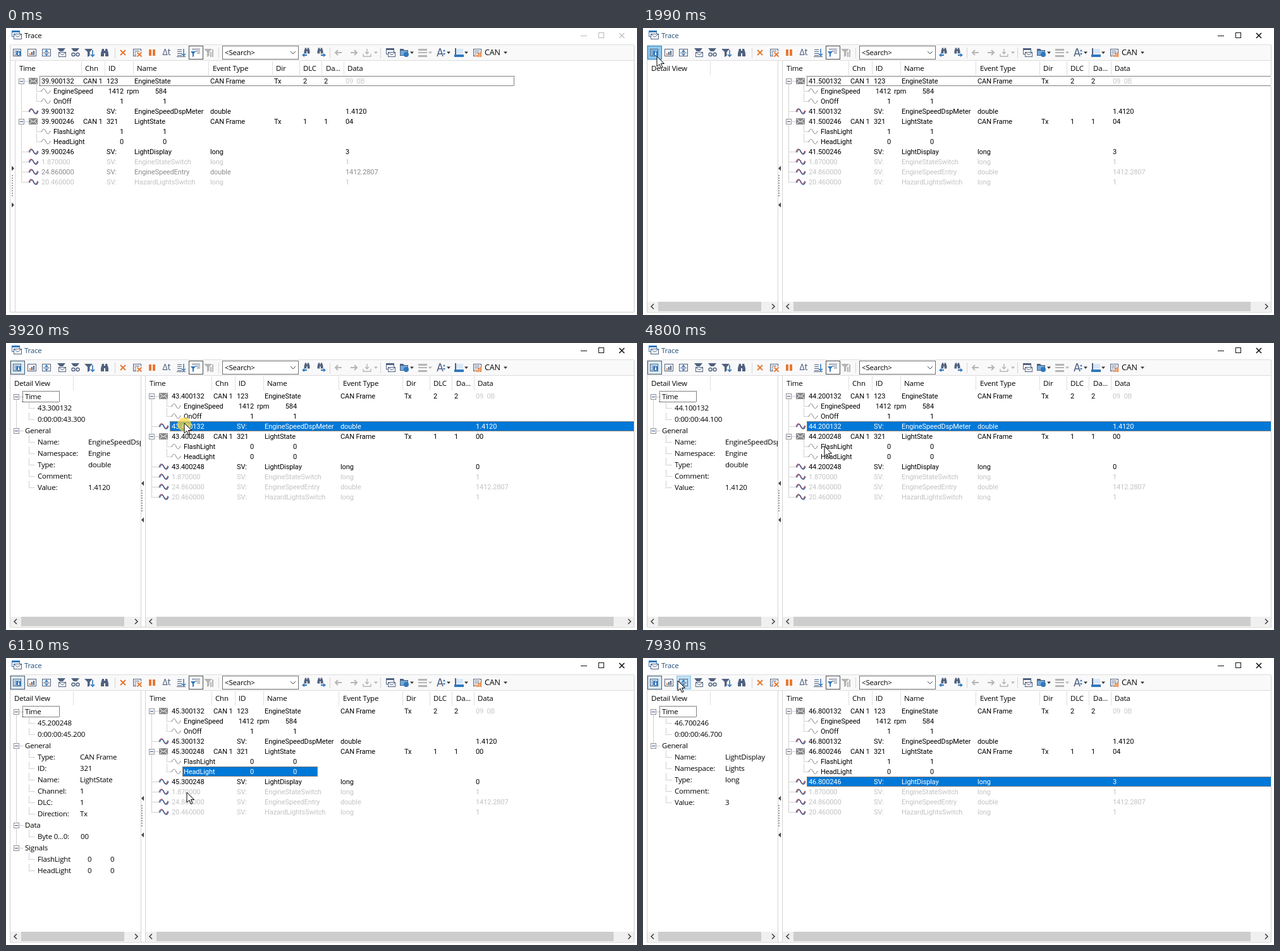
Recreate the animation shown at these times as an HTML page with a canvas. Size 998 px wide and 455 px high, loop 8000 ms.

```html
<!DOCTYPE html>
<html lang="en">
<head>
<meta charset="utf-8">
<title>Trace</title>
<style>
html, body { margin: 0; width: 998px; height: 455px; overflow: hidden; background: #fff; }
canvas { display: block; }
</style>
</head>
<body>
<canvas id="stage" width="998" height="455"></canvas>
<script>
const g = document.getElementById('stage').getContext('2d');
const LOOP = 8000, OPEN = 1780, SHIFT = 206;
const UI = '11.5px "Open Sans", "Noto Sans", sans-serif';
const ROW = '11px Roboto, "Liberation Sans", sans-serif';
const SLATE = '#50617f', BLUE = '#2f78bd', ORANGE = '#e87830', GRAY = '#b5b5b5', STALE = '#c3c3c3';

// time in ms -> simulation time in tenths of a second
const CLOCK = [[0, 399], [70, 400], [330, 401], [1960, 415], [2840, 425], [4790, 442],
  [6105, 453], [6920, 460], [7925, 468], [8000, 468.5]];
const POINTER = [[530, 250, 440], [900, 120, 200], [1270, 45, 57], [1530, 22, 45], [2200, 22, 45],
  [2720, 275, 83], [3300, 275, 83], [3650, 282, 127], [4320, 282, 127], [4700, 287, 163],
  [5190, 287, 166], [5340, 286, 166], [5560, 286, 179], [5800, 286, 181], [6080, 286, 213],
  [6420, 286, 213], [6620, 284, 193], [7150, 284, 193], [7580, 70, 46], [7800, 55, 36], [8000, 55, 36]];
const CLICKS = [1700, 2800, 3780, 4900, 5580, 6270, 6830];
const SELECT = [[2830, 0], [3800, 3], [4940, 5], [5610, 6], [6300, 8], [6870, 7]];

function track(keys, t) {
  let i = 1;
  while (i < keys.length - 1 && keys[i][0] <= t) i++;
  const a = keys[i - 1], b = keys[i];
  const k = Math.min(1, Math.max(0, (t - a[0]) / (b[0] - a[0])));
  return a.slice(1).map((v, j) => v + (b[j + 1] - v) * k);
}

function stateAt(t) {
  const n = Math.floor(track(CLOCK, Math.max(0, t))[0] + 1e-6);
  const on = n % 10 >= 5;
  return { on, sec: (n / 10).toFixed(1) + '00', tail: on ? '246' : '248' };
}

function box(x, y, w, h, fill) { g.fillStyle = fill; g.fillRect(x, y, w, h); }
function frame(x, y, w, h, color) {
  g.strokeStyle = color; g.lineWidth = 1;
  g.strokeRect(x + .5, y + .5, w - 1, h - 1);
}
function line(x1, y1, x2, y2, color, dash = []) {
  g.strokeStyle = color; g.lineWidth = 1; g.setLineDash(dash);
  g.beginPath(); g.moveTo(x1, y1); g.lineTo(x2, y2); g.stroke(); g.setLineDash([]);
}
// one-pixel dots, aligned to the pixel grid
function dots(x1, y1, x2, y2, c = '#a0a0a0') {
  const ox = x1 === x2 ? .5 : 0, oy = .5 - ox;
  line(x1 + ox, y1 + oy, x2 + ox, y2 + oy, c, [1, 1]);
}
function dotFrame(x, y, w, h, c) {
  dots(x, y, x + w, y, c); dots(x, y + h, x + w, y + h, c);
  dots(x, y, x, y + h, c); dots(x + w, y, x + w, y + h, c);
}
function text(s, x, y, color = '#000', font = ROW, align = 'left') {
  g.font = font; g.textAlign = align; g.fillStyle = color;
  g.letterSpacing = font === UI ? '-0.2px' : '-0.1px';
  g.fillText(s, x, y + 4);
}
const label = (s, x, y, c = '#000', align) => text(s, x, y, c, UI, align);
function path(x, y, d, fill, stroke, width = 1) {
  g.save(); g.translate(x, y);
  const p = new Path2D(d);
  if (fill) { g.fillStyle = fill; g.fill(p); }
  if (stroke) { g.strokeStyle = stroke; g.lineWidth = width; g.stroke(p); }
  g.restore();
}

function envelope(x, y, w, h, c, bg = '#fff') {
  box(x, y, w, h, bg); frame(x, y, w, h, c);
  path(x, y, `M1 1L${w / 2} ${h * .6}L${w - 1} 1`, null, c);
}
function wave(x, y, c, w = 1) { path(x, y, 'M0 1C2 -5 5 -5 7 0S12 5 14 -1', null, c, w); }
function expander(x, y) {
  box(x - 4, y - 4, 9, 9, '#fff'); frame(x - 4, y - 4, 9, 9, '#919191');
  box(x - 2, y, 5, 1, '#2f4f8f');
}
const caret = (x, c = '#333') => path(x, 39, 'M-3 -1.5H3L0 2Z', c);
const funnel = (x, c) => path(x, 39, 'M-7 -6H6L1.5 -1V5L-2 7V-1Z', c);
const binoculars = (x, y, c = SLATE, s = 1) => {
  g.save(); g.translate(x, y); g.scale(s, s);
  path(0, 0, 'M-4 -6H-1V-3H1V-6H4L6 1V6H1V1H-1V6H-6V1Z', c);
  g.restore();
};
const cross = (x, y, r, w) => path(x, y, `M${-r} ${-r}L${r} ${r}M${r} ${-r}L${-r} ${r}`, null, ORANGE, w);
const arrow = (x, y, dir, c) => path(x, y, `M${-5 * dir} 0H${4 * dir}M${dir} -4L${5 * dir} 0L${dir} 4`, null, c, 2);
const smallArrow = (x, y, dir) => path(x, y, `M${-4 * dir} -1H0V-3L${4 * dir} 0L0 3V1H${-4 * dir}Z`, BLUE);
function page(x, c, rows = 3) {
  frame(x - 7, 33, 13, 12, c);
  for (let i = 0; i < rows; i++) box(x - 5, 36 + i * 3, 8, 1, c);
}

function button(x, border, fill) { box(x - 11, 28, 23, 22, fill); frame(x - 11, 28, 23, 22, border); }

function toolbar(t, px, py) {
  box(7, 26, 986, 26, '#f9f9fa');
  line(7, 26.5, 993, 26.5, '#dcdddf');
  const over = x => t > 1300 && py > 27 && py < 51 && Math.abs(px - x) < 12;
  const open = t >= OPEN;
  if (open) button(18, over(18) ? '#2580c4' : '#4c5765', over(18) ? '#8fc8ef' : '#d9ebf8');
  else if (over(18)) button(18, '#86bfe8', '#c6e0f4');
  for (const x of [41, 64]) if (over(x)) button(x, '#8fc3ea', '#c3dff4');
  button(300, '#4b4b4b', '#fff');

  page(18, SLATE);
  path(20, 40, 'M4 0A4 4 0 1 1 -4 0A4 4 0 1 1 4 0Z', BLUE);
  box(19, 39, 2, 4, '#fff'); box(19, 37, 2, 1, '#fff');
  frame(34, 33, 14, 12, SLATE);
  box(37, 40, 2, 3, ORANGE); box(40, 38, 2, 5, SLATE); box(43, 36, 2, 7, SLATE);
  frame(57, 33, 14, 12, SLATE);
  path(64, 39, 'M-5 .5H5', null, SLATE);
  path(64, 39, 'M-3 -1L0 -5L3 -1ZM-3 2L0 5L3 2Z', BLUE);
  path(88, 36, 'M-7 -4H6L2 1H-3Z', SLATE); envelope(83, 38, 12, 8, SLATE);
  path(110, 36, 'M-7 -4H6L2 1H-3Z', SLATE);
  path(110, 42, 'M-1 0A2.5 2.5 0 1 1 -6 0A2.5 2.5 0 1 1 -1 0ZM6 0A2.5 2.5 0 1 1 1 0A2.5 2.5 0 1 1 6 0Z', '#fff', SLATE, 1.4);
  funnel(131, SLATE); path(137, 39, 'M0 -4V6M-3 3L0 6L3 3', null, BLUE, 1.6);
  binoculars(156, 39);
  cross(185, 39, 4, 2);
  page(208, SLATE); box(206, 37, 9, 9, '#f9f9fa'); cross(211, 42, 3.5, 1.8);
  box(226, 34, 4, 10, ORANGE); box(232, 34, 4, 10, ORANGE);
  text('Δt', 254, 39, SLATE, '14px "Noto Sans", sans-serif', 'center');
  for (let i = 0; i < 4; i++) box(271, 34 + i * 3, 7, 1, SLATE);
  path(281, 39, 'M0 -6V4M-3 2L0 5L3 2', null, BLUE, 1.5);
  box(270, 45, 14, 1, SLATE);
  box(294, 33, 13, 1, SLATE); box(299, 36, 8, 1, SLATE); box(302, 39, 5, 1, SLATE);
  path(296, 41, 'M-4 -4H4L1 0V4L-1 5V0Z', BLUE);
  funnel(320, GRAY); box(323, 38, 2, 8, GRAY); box(326, 34, 2, 12, GRAY);

  box(342, 28, 121, 22, '#fff'); frame(342, 28, 121, 22, '#707070');
  label('<Search>', 346, 39);
  path(454, 39, 'M-4 -2L0 2L4 -2', null, '#444');
  binoculars(476, 36, SLATE, .75); smallArrow(472, 43, -1);
  binoculars(497, 36, SLATE, .75); smallArrow(502, 43, 1);
  arrow(526, 39, -1, GRAY); arrow(550, 39, 1, GRAY);
  path(571, 39, 'M0 -6V2M-3 -1L0 2L3 -1M-6 2V6H6V2', null, GRAY, 1.4); caret(585, GRAY);
  box(601, 32, 13, 10, SLATE); box(602, 35, 11, 6, '#fff'); envelope(604, 38, 12, 8, SLATE);
  path(630, 39, 'M-7 -6H-2L0 -4H6V5H-7Z', SLATE); box(624, 36, 11, 7, '#70a9dc');
  path(633, 42, 'M4 0A4 4 0 1 1 -4 0A4 4 0 1 1 4 0Z', BLUE); caret(642);
  for (const y of [33, 38, 43]) box(652, y, 14, y === 38 ? 2 : 3, GRAY);
  caret(671, GRAY);
  path(687, 39, 'M-5 6L-1 -6H0L4 6M-3 2H3', null, SLATE, 1.6);
  path(693, 39, 'M-2 -2L0 -5L2 -2ZM-2 1L0 4L2 1Z', BLUE); caret(700);
  path(711, 39, 'M0 -7V3', null, SLATE, 2); box(712, 33, 11, 8, '#d7e7f5');
  box(709, 42, 15, 4, BLUE); caret(728);
  page(746, SLATE); box(743, 40, 10, 6, '#fff');
  for (let i = 0; i < 3; i++) box(744 + i * 3, 42 - i * 2, 2, 4 + i * 2, ORANGE);
  text('CAN', 757, 39, '#000', '12.5px "Open Sans", sans-serif'); caret(790);
  for (const x of [172, 336, 512, 592]) box(x, 31, 1, 17, '#d5d5d5');
}

function titleBar(active) {
  box(9, 4, 13, 10, BLUE); box(10, 7, 11, 6, '#fff'); envelope(12, 9, 13, 9, SLATE);
  label('Trace', 29, 12, active ? '#1f4e79' : '#000');
  const c = active ? '#111' : '#b9b9b9';
  box(909, 12, 10, 1, c); frame(937, 7, 9, 9, c);
  path(974, 12, 'M-4 -4L4 4M4 -4L-4 4', null, c, active ? 1.6 : 1.1);
}

function scrollbar(x, w, from, to) {
  box(x, 434, w, 15, '#f0f0f0');
  box(from, 434, to - from, 15, '#cdcdcd');
  path(x + 8, 441.5, 'M2 -4L-2 0L2 4', null, '#444', 1.6);
  path(x + w - 7, 441.5, 'M-2 -4L2 0L-2 4', null, '#444', 1.6);
}

function traceRows(s, t) {
  const fade = t < 70 ? '#8c8c8c' : STALE, f = s.on ? '1' : '0';
  const a = s.sec + '132', b = s.sec + s.tail;
  return [
    { cells: [a, 'CAN 1', '123', 'EngineState', 'CAN Frame', 'Tx', '2', '2', '09  0B'], open: true, dim: true },
    { sig: ['EngineSpeed', '1412', 'rpm', '584'] },
    { sig: ['OnOff', '1', '', '1'] },
    { cells: [a, '', 'SV:', 'EngineSpeedDspMeter', 'double', '', '', '', '1.4120'] },
    { cells: [b, 'CAN 1', '321', 'LightState', 'CAN Frame', 'Tx', '1', '1', s.on ? '04' : '00'], open: true },
    { sig: ['FlashLight', f, '', f] },
    { sig: ['HeadLight', '0', '', '0'] },
    { cells: [b, '', 'SV:', 'LightDisplay', 'long', '', '', '', s.on ? '3' : '0'] },
    { cells: ['1.870000', '', 'SV:', 'EngineStateSwitch', 'long', '', '', '', '1'], color: STALE },
    { cells: ['24.860000', '', 'SV:', 'EngineSpeedEntry', 'double', '', '', '', '1412.2807'], color: fade },
    { cells: ['20.460000', '', 'SV:', 'HazardLightsSwitch', 'long', '', '', '', '1'], color: STALE }
  ];
}

const HEADS = ['Time', 'Chn', 'ID', 'Name', 'Event Type', 'Dir', 'DLC', 'Da...', 'Data'];
const HEAD_X = [21, 125, 162, 207, 327, 427, 470, 506, 540];
const CELL_X = [56, 122, 159, 203, 323, 424, 470, 503, 537];
const EDGES = [119, 156, 201, 320, 421, 464, 499, 534];

function table(t, dx, selected) {
  HEADS.forEach((h, i) => label(h, HEAD_X[i] + dx, 64));
  for (const x of EDGES) box(x + dx, 53, 1, 22, '#dedede');
  dots(24 + dx, 88, 24 + dx, 244);
  traceRows(stateAt(t), t).forEach((r, i) => {
    const y = 84 + i * 16, sel = i === selected;
    if (sel) {
      const x = r.sig ? 279 : 259, w = (r.sig ? 493 : 994) - x;
      box(x, y - 8, w, 16, '#0078d7');
      dotFrame(x, y - 8, w - 1, 15, '#ff8728');
    } else if (!i && selected < 0) dotFrame(53 + dx, 76, dx ? 734 : 750, 15, '#000');
    const color = sel ? '#fff' : r.color || '#000';
    if (r.sig) {
      const [name, value, unit, raw] = r.sig;
      dots(48 + dx, y - 12, 48 + dx, y); dots(48 + dx, y, 55 + dx, y);
      wave(56 + dx, y, '#777');
      text(name, 75 + dx, y, color);
      text(value, 186 + dx, y, color, ROW, 'right');
      text(unit, 191 + dx, y, color);
      text(raw, 254 + dx, y, color, ROW, 'right');
      return;
    }
    dots(24 + dx, y, 35 + dx, y);
    if (r.open) {
      expander(24 + dx, y);
      box(36 + dx, y - 5, 14, 10, '#8a8a8a');
      path(36 + dx, y - 5, 'M1 1L7 6L13 1M1 9L5 5M13 9L9 5', null, '#fff');
    } else {
      wave(36 + dx, y - .5, '#c0504d', 1.2);
      wave(37 + dx, y + .5, '#28559a', 1.2);
    }
    r.cells.forEach((c, k) => text(c, CELL_X[k] + dx, y, k === 8 && r.dim && !sel ? '#c8c8c8' : color));
  });
}

// each entry is either a group title or a list of [text, x, right-aligned]
function detailRows(t, selected) {
  const s = stateAt(t - 90), v = s.on ? '3' : '0', f = s.on ? '1' : '0';
  const time = (stamp, clock) => ['Time', [[stamp, 50]], [['0:00:00:' + clock, 50]], 'General'];
  const pairs = (list, x) => list.map(([k, value]) => [[k, 50], [value, x]]);
  if ([3, 7, 8].includes(selected)) {
    const [stamp, clock, name, space, type, value] = {
      3: [s.sec + '132', s.sec, 'EngineSpeedDspMeter', 'Engine', 'double', '1.4120'],
      7: [s.sec + s.tail, s.sec, 'LightDisplay', 'Lights', 'long', v],
      8: ['1.870000', '01.870', 'EngineStateSwitch', 'Engine', 'long', '1']
    }[selected];
    return [...time(stamp, clock), ...pairs([['Name:', name], ['Namespace:', space],
      ['Type:', type], ['Comment:', ''], ['Value:', value]], 130)];
  }
  const engine = !selected;
  return [...time(s.sec + (engine ? '132' : s.tail), s.sec),
    ...pairs([['Type:', 'CAN Frame'], ['ID:', engine ? '123' : '321'],
      ['Name:', engine ? 'EngineState' : 'LightState'], ['Channel:', '1'],
      ['DLC:', engine ? '2' : '1'], ['Direction:', 'Tx']], 117),
    'Data',
    [[engine ? 'Byte 0...1:' : 'Byte 0...0:', 50], [engine ? '09  0B' : s.on ? '04' : '00', 118]],
    'Signals',
    ...(engine
      ? [[['EngineSpeed', 50], ['1412', 166, 1], ['rpm', 172]], [['OnOff', 50], ['1', 166, 1]]]
      : [[['FlashLight', 50], [f, 129], [f, 165]], [['HeadLight', 50], ['0', 129], ['0', 165]]])];
}

function detail(t, selected) {
  label('Detail View', 13, 64);
  box(106, 53, 1, 22, '#dedede');
  if (selected >= 0) {
    const rows = detailRows(t, selected);
    const last = rows.findLastIndex(r => typeof r === 'string');
    g.save(); g.beginPath(); g.rect(7, 52, 206, 382); g.clip();
    dots(16, 85, 16, 85 + last * 18);
    rows.forEach((r, i) => {
      const y = 85 + i * 18;
      if (typeof r === 'string') {
        dots(20, y, 27, y); expander(16, y); label(r, 30, y);
        return;
      }
      dots(36, y - 10, 36, y); dots(36, y, 46, y);
      for (const [s, x, right] of r) label(s, x, y, '#000', right ? 'right' : 'left');
    });
    dotFrame(26, 76, 58, 17, '#000');
    g.restore();
  }
  scrollbar(7, 206, 24, selected ? 187 : 150);
}

function splitter(x, dir) {
  for (const y of [222.5, 280.5]) path(x, y, `M${-2 * dir} -4L${2 * dir} 0L${-2 * dir} 4Z`, '#444');
  for (let y = 233; y < 268; y += 4) box(x - 2, y, 2, 2, '#a0a0a0');
}

function draw(t) {
  const open = t >= OPEN;
  const selected = SELECT.reduce((row, [at, r]) => t >= at ? r : row, -1);
  const [px, py] = track(POINTER, t);
  box(0, 0, 998, 455, '#fff');
  titleBar(open);
  toolbar(t, px, py);
  line(7, 51.5, 993, 51.5, '#dcdcdc');
  if (open) {
    line(213.5, 52, 213.5, 450, '#d4d4d4');
    line(220.5, 52, 220.5, 450, '#d4d4d4');
    splitter(216, -1);
    detail(t, selected);
    scrollbar(221, 772, 238, 961);
  } else {
    line(14.5, 52, 14.5, 450, '#d4d4d4');
    splitter(11, 1);
  }
  table(t, open ? SHIFT : 0, selected);
  line(6.5, 27, 6.5, 450, '#d0d0d0');
  line(993.5, 27, 993.5, 450, '#d0d0d0');
  line(6, 450.5, 994, 450.5, '#d0d0d0');
  if (CLICKS.some(c => t >= c && t < c + 240)) {
    g.fillStyle = 'rgba(255,220,60,.7)';
    g.beginPath(); g.arc(px, py + 2, 11, 0, 7); g.fill();
  }
  if (t >= 530) path(px, py, 'M0 0V16L4 12.5L6.5 18.5L9 17.5L6.5 11.5H11.5Z', '#fff', '#000');
}

function tick(now) {
  draw(now % LOOP);
  requestAnimationFrame(tick);
}
requestAnimationFrame(tick);
</script>
</body>
</html>
```
